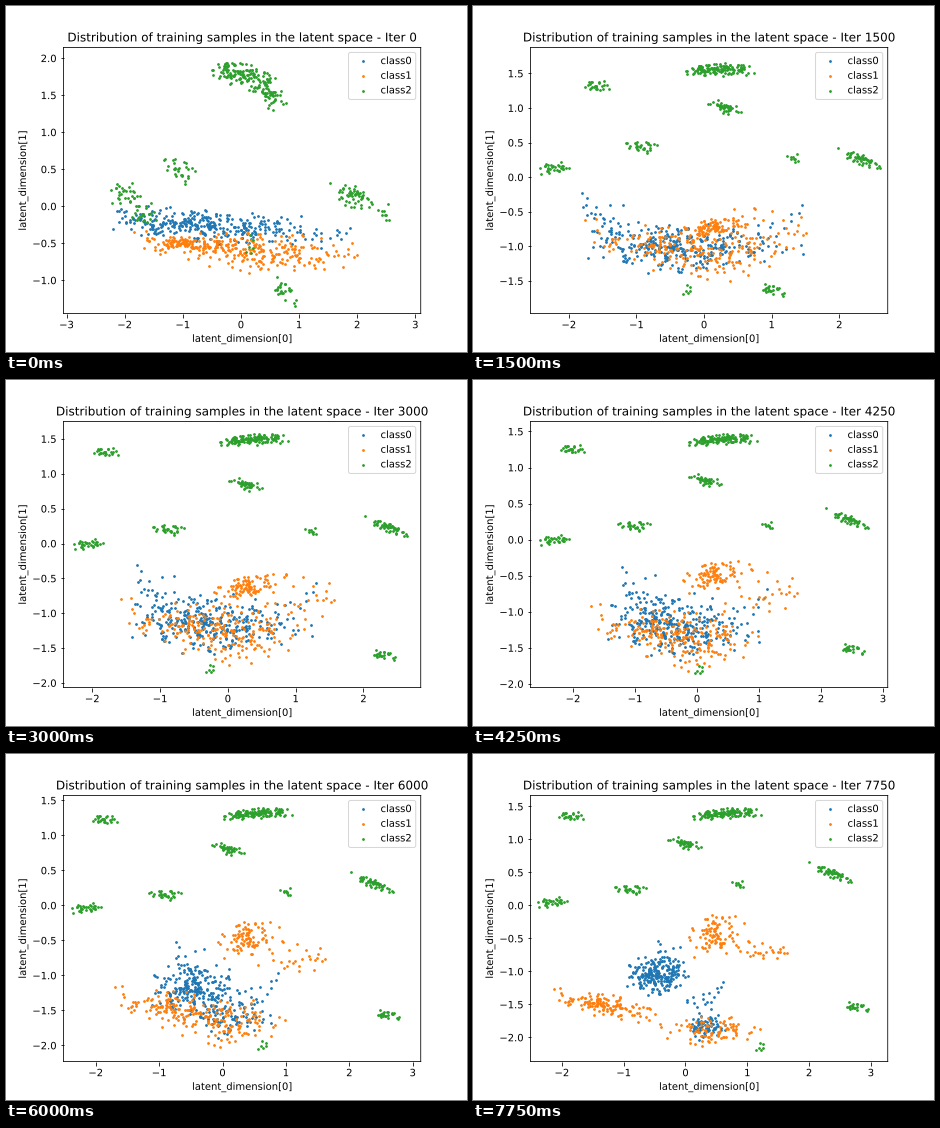
A matplotlib script for the animation above (8 s loop, 461 px wide and 346 px high).

```python
import numpy as np
import matplotlib.pyplot as plt
from matplotlib.animation import FuncAnimation
from matplotlib.patheffects import Normal
from matplotlib.ticker import MultipleLocator

FRAMES = 32
STEP = 250
WIDTH, HEIGHT = 461, 346
LEFT, RIGHT, TOP, BOTTOM = 57.6, 414.72, 41.47, 307.58

rng = np.random.default_rng(7)
groups = {"class0": [], "class1": [], "class2": []}

# Edges of the view in data units: x0, x1, y0, y1
VIEW_STOPS = (0, 6, 12, 17, 21, 24, 31)
VIEW = (
    (-3.05, -2.565, -2.422, -2.684, -2.564, -2.506, -2.506),
    (3.093, 2.716, 2.844, 3.076, 3.034, 3.126, 3.272),
    (-1.449, -1.971, -2.066, -2.05, -2.09, -2.23, -2.365),
    (2.146, 1.876, 1.751, 1.639, 1.544, 1.571, 1.667),
)
ISLAND_STOPS = (0, 6, 12, 31)
MASS_STOPS = (0, 6, 21, 31)


def settle(start, end, frame):
    """Fast decay from the untrained value to the trained one."""
    return end + (start - end) * np.exp(-frame / 3)


def linear(ends, frame):
    return np.interp(frame, (0, FRAMES - 1), ends)


def cloud(label, count, stops, path, shape):
    """Random cloud whose centre follows path; shape(frame) is width, height, tilt."""
    z = rng.normal(size=(2, count))
    z[np.abs(z) > 2.4] *= 0.5

    def place(frame):
        cx, cy = (np.interp(frame, stops, axis) for axis in zip(*path))
        wide, high, tilt = shape(frame)
        dx = wide * z[0]
        return cx + dx, cy + high * z[1] + tilt * dx

    groups[label].append(place)


def island(count, tilt, *path):
    """Compact class2 cluster that flattens as training starts."""
    cloud("class2", count, ISLAND_STOPS, path,
          lambda f: (1.3 * np.sqrt(count), settle(6, 2.4, f), settle(0.3, tilt, f)))


def mass(label, count, wide, high, tilt, *path, swell=0.8):
    """Large overlapping cloud that is thickest halfway through."""
    cloud(label, count, MASS_STOPS, path,
          lambda f: (linear(wide, f),
                     linear(high, f) * (1 + swell * np.sin(np.pi * f / FRAMES)),
                     settle(0.08, tilt, f)))


# Centres are in stage pixels
mass("class0", 210, (46, 14), (8, 8), 0.05, (205, 221), (200, 242), (194, 244), (184, 222))
mass("class0", 75, (50, 9), (8, 6), 0, (240, 222), (250, 243), (228, 262), (235, 274))
mass("class0", 30, (16, 8), (7, 8), 0.5, (140, 216), (132, 214), (180, 220), (197, 207))
mass("class0", 18, (30, 12), (7, 6), -0.5, (300, 225), (290, 224), (255, 238), (232, 243))

mass("class1", 130, (42, 22), (8, 5), 0.2, (225, 243), (200, 243), (186, 257), (132, 251))
mass("class1", 90, (32, 22), (9, 6), 0, (255, 247), (245, 245), (218, 266), (237, 277))
mass("class1", 83, (17, 12), (3, 10), -0.2, (180, 237), (243, 220), (242, 184), (243, 178),
     swell=0)
mass("class1", 30, (30, 21), (9, 4), 0.1, (300, 245), (285, 222), (280, 204), (278, 195))

island(130, -0.05, (239, 69), (246, 63), (247, 59), (253, 59))
island(40, 0.2, (266, 91), (254, 102), (242, 105), (214, 90))
island(25, 0.15, (140, 208), (126, 80), (102, 72), (100, 62))
island(28, 0, (174, 163), (169, 140), (163, 149), (158, 135))
island(30, 0, (121, 188), (83, 162), (84, 164), (81, 148))
island(52, 0.4, (346, 188), (387, 152), (381, 146), (358, 118))
island(9, 0.2, (380, 207), (322, 152), (307, 151), (267, 130))
island(24, 0, (279, 286), (300, 284), (378, 275), (384, 253))
island(6, 0, (245, 240), (215, 284), (205, 289), (288, 293))

plt.rcParams["text.hinting"] = "none"
fig = plt.figure(figsize=(6.403, 4.806), dpi=72)
ax = fig.add_axes([LEFT / WIDTH, 1 - BOTTOM / HEIGHT,
                   (RIGHT - LEFT) / WIDTH, (BOTTOM - TOP) / HEIGHT])
ax.xaxis.set_major_locator(MultipleLocator(1))
ax.yaxis.set_major_locator(MultipleLocator(0.5))
labels = [ax.set_xlabel("latent_dimension[0]"),
          ax.set_ylabel("latent_dimension[1]"),
          ax.title]
dots = {label: ax.scatter([], [], s=3, label=label, color=f"C{i}",
                          transform=ax.transAxes)
        for i, label in enumerate(groups)}
legend = ax.legend(loc="upper right")
labels += legend.get_texts()
for patch in [*ax.spines.values(), legend.get_frame()]:
    patch.set_snap(False)


def draw(frame):
    x0, x1, y0, y1 = (np.interp(frame, VIEW_STOPS, edge) for edge in VIEW)
    ax.set_xlim(x0, x1)
    ax.set_ylim(y0, y1)
    ax.set_title("Distribution of training samples in the latent space"
                 f" - Iter {frame * STEP}")
    for label, points in dots.items():
        x, y = np.hstack([place(frame) for place in groups[label]])
        points.set_offsets(np.column_stack([(x - LEFT) / (RIGHT - LEFT),
                                            (BOTTOM - y) / (BOTTOM - TOP)]))
    # Path effects draw text as outlines, free of pixel rounding
    for text in labels + ax.get_xticklabels() + ax.get_yticklabels():
        text.set_path_effects([Normal()])
    return list(dots.values())


anim = FuncAnimation(fig, draw, frames=FRAMES, interval=STEP,
                     repeat=True, repeat_delay=0, blit=False)
plt.show()
```
